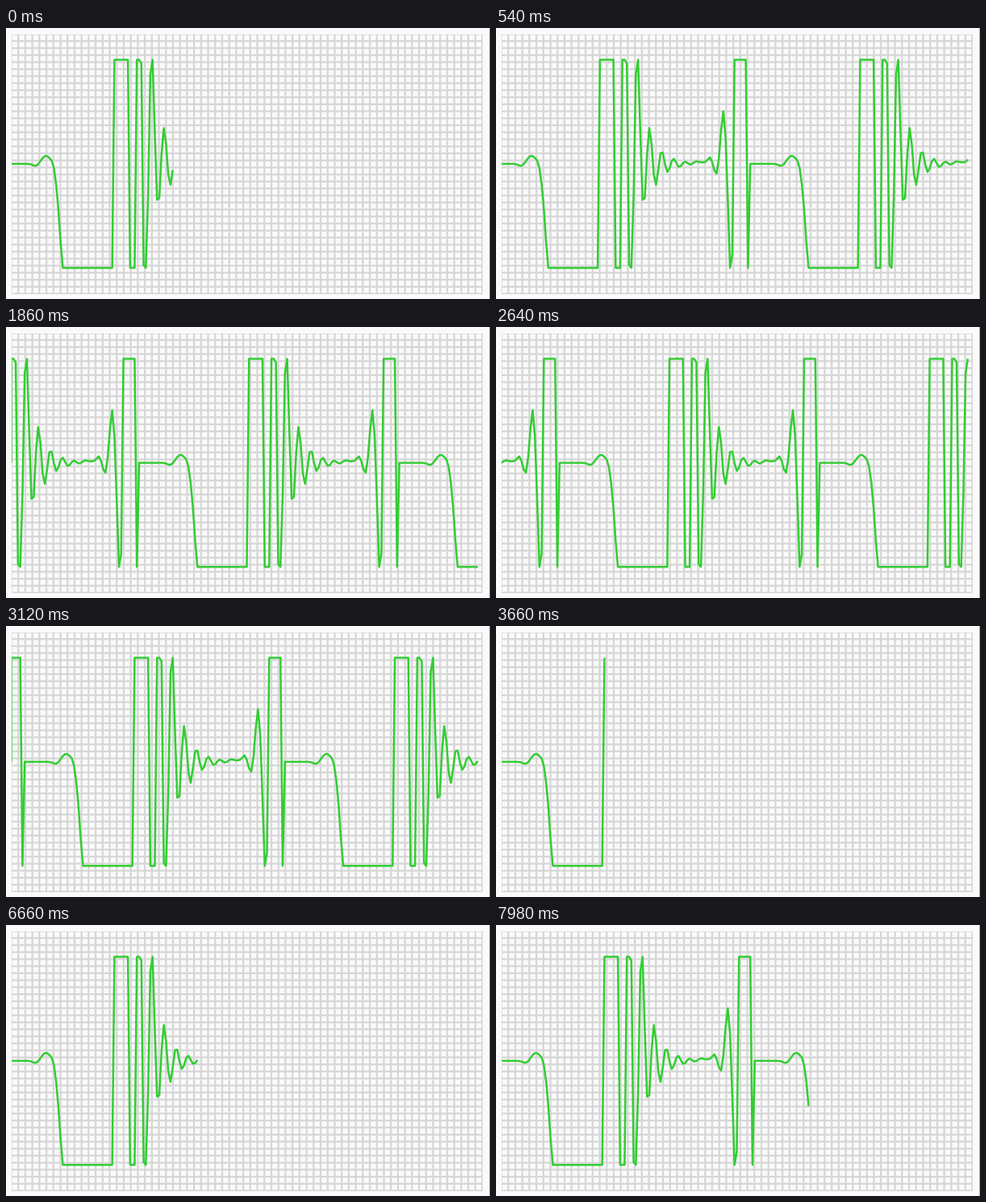
Write a matplotlib script that moves like this. It is 600 px wide and 337 px high and loops after 8000 ms.

```python
import matplotlib.pyplot as plt
import numpy as np
from matplotlib.animation import FuncAnimation
from matplotlib.collections import LineCollection
from matplotlib.patches import Rectangle

W, H, DPI = 600, 337, 100
PX = 72 / DPI                      # points per pixel
LEFT, RIGHT, TOP, BOTTOM = 6.5, 590.5, 7.5, 330.5
COLS, ROWS = 67, 37
DX = (RIGHT - LEFT) / 210          # sample spacing
SPAN = 208                         # samples across before scrolling
MID, AMP = 168.9, 129.4            # baseline and clipping level
PERIOD = 116                       # samples per beat
TICK, STEP, LOOP = 20, 60, 8000    # ms
RATE = 2.45                        # samples per step

# Start of each sweep (ms) and the newest sample at that moment
SWEEPS = [(0, 72), (480, 207.7), (3540, 42.05), (5220, 25)]


def beat():
    """Height above the baseline for each sample of one beat."""
    i = np.arange(PERIOD)

    def bump(height, center, width):
        return height * np.exp(-((i - center) / width) ** 2 / 2)

    # Gentle hump, then a fall into the lower limit
    fall = 7 * np.maximum(i - 18, 0) ** 1.9
    lead = bump(10, 15.5, 1.9) - bump(3, 11, 1.3) - fall

    # Decaying chirp, then a second, sharper spike
    u = i - 57
    ring = 44 * np.exp((68.1 - i) / 5.6) * np.cos(
        2 * np.pi * (u / 5.8 + 0.00047 * u ** 2))
    ring += bump(27, 63.5, 1.9) + bump(2.5, 91, 3)
    spike = (bump(7, 95, 0.8) - bump(14, 97.8, 0.8)
             + bump(66, 101, 1.05) - bump(140, 104.35, 1))

    up = np.select([i < 46, i < 53, i < 106, i < 112, i == 112],
                   [lead, AMP, ring + spike, AMP, -AMP], 0)
    return np.clip(up, -AMP, AMP)


WAVE = MID - beat()


def trace(t):
    start, first = [s for s in SWEEPS if s[0] <= t][-1]
    last = int(first + RATE * (t - start) / STEP)
    shift = max(0, last - SPAN)
    j = np.arange(last - shift + 1)
    x = np.r_[LEFT, LEFT + DX * j]
    y = np.r_[MID, WAVE[(j + shift) % PERIOD]]
    return x, y


fig = plt.figure(figsize=(W / DPI, H / DPI), dpi=DPI, facecolor="#fafafa")
ax = fig.add_axes([0, 0, 1, 1])
ax.set_xlim(0, W)
ax.set_ylim(H, 0)
ax.axis("off")

canvas = Rectangle((LEFT, TOP), RIGHT - LEFT, BOTTOM - TOP, fc="none", ec="none")
ax.add_patch(canvas)

cols = [[(x, TOP), (x, BOTTOM)] for x in np.linspace(LEFT, RIGHT, COLS + 1)]
rows = [[(LEFT, y), (RIGHT, y)] for y in np.linspace(TOP, BOTTOM, ROWS + 1)]
grid = LineCollection(cols + rows, colors="#d7d7d7", linewidths=2.3 * PX)
grid.set_snap(False)
ax.add_collection(grid)
grid.set_clip_path(canvas)

ax.add_patch(Rectangle((W - 1, 0), 1, H, fc="#b0b0b0", ec="none"))

line, = ax.plot([], [], color="#32cd32", lw=2.5 * PX, snap=False,
                solid_capstyle="butt", solid_joinstyle="round")
line.set_clip_path(canvas)


def draw(i):
    line.set_data(*trace(i * TICK // STEP * STEP))
    return line,


anim = FuncAnimation(fig, draw, frames=LOOP // TICK, interval=TICK,
                     init_func=lambda: draw(0), repeat=True, repeat_delay=0,
                     blit=True)
plt.show()
```
